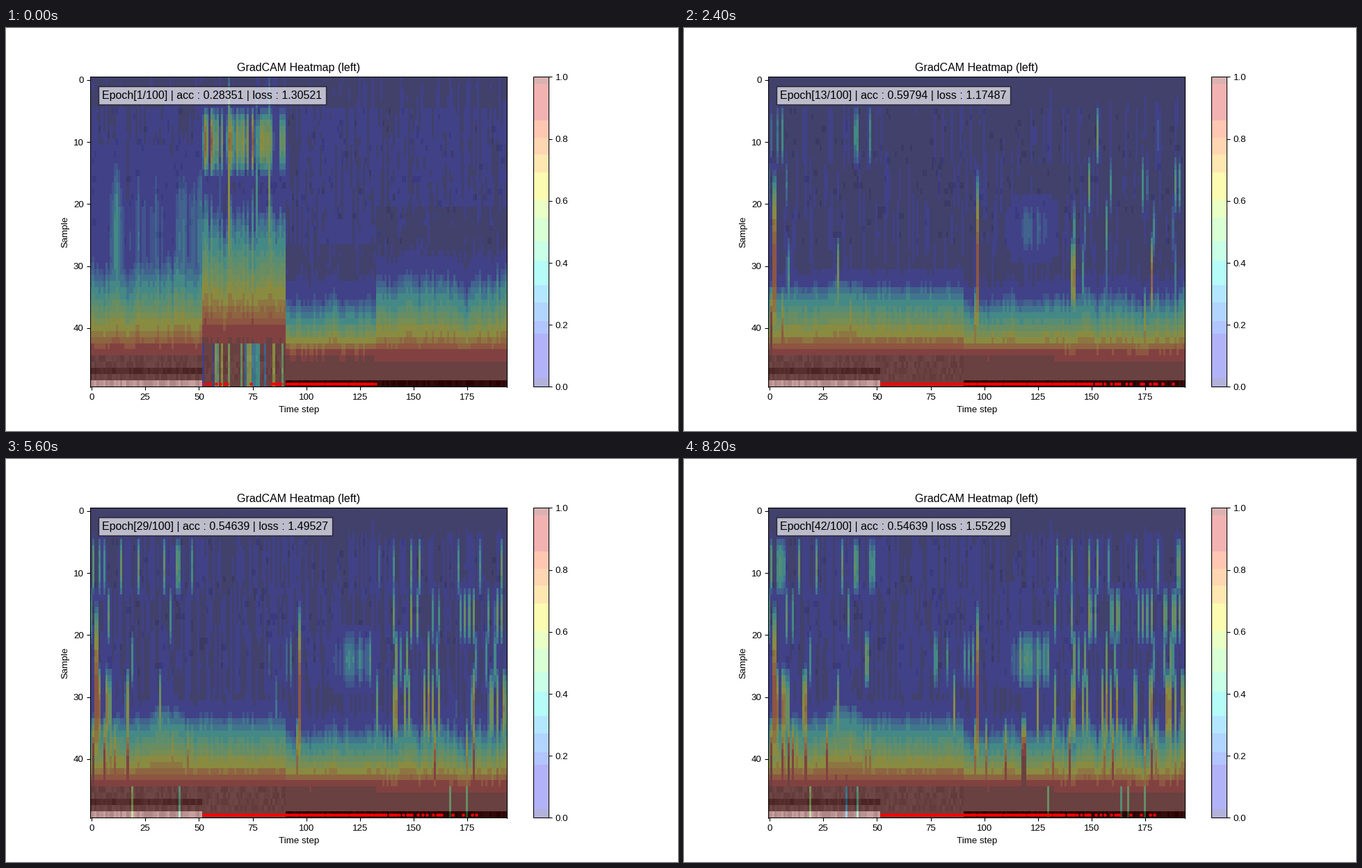
Write a matplotlib script that moves like this. It is 966 by 580 pixels and loops after 8400 ms.

```python
import matplotlib.pyplot as plt
import numpy as np
from matplotlib.animation import FuncAnimation
from matplotlib.colors import ListedColormap

ROWS, COLS, EPOCHS = 50, 194, 42
KEYS = [1, 6, 13, 22, 29, 34, 42]
ACC = [0.28351, 0.68557, 0.59794, 0.54124, 0.54639, 0.55155, 0.54639]
LOSS = [1.30521, 0.87968, 1.17487, 1.45368, 1.49527, 1.51022, 1.55229]

rng = np.random.default_rng(7)
R = np.arange(ROWS)[:, None]
C = np.arange(COLS)
GROUP = np.searchsorted([52, 91, 133], C, side="right")

plt.rcParams.update({
    "font.family": "Liberation Sans", "font.size": 9.62,
    "axes.titlesize": 11.55, "axes.linewidth": 0.77,
})


def smooth(a, n, axis):
    out = np.apply_along_axis(np.convolve, axis, a, np.ones(n) / n, mode="same")
    return out / out.std()


STREAKY = smooth(rng.normal(size=(ROWS, COLS)), 9, 0)
WAVE = smooth(rng.normal(size=COLS), 5, 0)
FINE = rng.normal(size=COLS)
JITTER = 0.5 * WAVE + 0.5 * FINE
TONE = np.clip(0.75 + 0.25 * FINE, 0.2, 1.2)


def chance(p):
    return rng.random(COLS) < p


def by_group(*values):
    return np.take(values, GROUP)


def hump(mid, half):
    """Vertical parabola, 1 at `mid` and 0 beyond `half` rows."""
    return np.clip(1 - ((R - mid) / half) ** 2, 0, 1)


def ramp(start, teal, full, lift):
    """Rise from blue below `start` over `teal` to dark red at `full`."""
    a, b = start - lift, teal - lift
    low = 0.3 * np.clip((R - a) / (b - a), 0, 1) ** 2
    high = 0.7 * np.clip((R - b) / (full - b), 0, 1) ** 1.3
    return np.where(R > 45, 1, low + high)


def stepped_jet():
    """Jet colours merged into a few unequal bands."""
    edges = np.array([0, .025, .17, .209, .271, .327, .406, .469, .547,
                      .6, .69, .749, .807, .861, .978, 1])
    band = np.digitize(np.linspace(0, 0.999, 256), edges) - 1
    return ListedColormap(plt.get_cmap("jet")((edges[:-1] + edges[1:])[band] / 2))


def base_image():
    """Grey signal image below the heat."""
    grain = rng.choice([-1, 0, 1], size=(ROWS, COLS))
    spots = smooth(rng.normal(size=(ROWS, COLS)), 2, 1)
    img = np.full((ROWS, COLS), 0.365)
    img[(spots > 1.6) & (R > 4) & (R < 27)] = 0.33
    left, signal = GROUP == 0, (R > 44) & (GROUP < 2)
    img += np.where(signal, 0.03 * grain, 0)
    img[47, left] -= 0.13
    img[49] = by_group(0.82, 0.365, 0.04, 0.04) + by_group(0.07, 0, 0.03, 0.03) * grain[49]
    return img


def first_field():
    """Untrained look: bright second group, blue haze elsewhere."""
    second = GROUP == 1
    calm = (GROUP > 1) & (R > by_group(0, 0, 26, 20))
    haze = np.where(calm, 0.01, np.where(R < 5, 0.015, 0.037)) + 0.017 * STREAKY
    lift = JITTER * by_group(1.4, 3, 0.8, 1.2) + 2 * np.exp(-((C - 40) / 5) ** 2)
    h = np.maximum(haze, ramp(by_group(21, 15, 30, 26), by_group(32, 23.5, 37.3, 34),
                              by_group(45, 42.5, 45.2, 45.4), lift))
    mist = by_group(0.2, 0, 0, 0) + 0.09 * np.where(GROUP == 0, WAVE, 0)
    h = np.maximum(h, mist * hump(26, 17))
    h = np.maximum(h, np.where(second, 0.68 * TONE, 0) * hump(10, 6.5))
    tall = second & chance(0.2)
    h = np.maximum(h, np.where(tall, 0.62 * TONE, 0) * hump(18, 22))
    drop = second & chance(0.4)
    return np.where(drop & (R > 42), rng.uniform(0.08, 0.7, COLS), h)


def second_field():
    """Calm top, even ramps, a few tall columns."""
    lift = JITTER * by_group(0.8, 0.9, 0.3, 0.4)
    lift += np.where(C < 22, 2.5 * np.abs(FINE), 0)
    lift += np.where((GROUP == 2) & chance(0.08), 8, 0)
    h = np.maximum(0.008 + 0.007 * STREAKY,
                   ramp(by_group(28, 23, 28, 28), by_group(34.5, 33, 39, 34),
                        by_group(45, 45, 45.2, 45.4), lift))
    for col, peak, mid in ((6, 0.6, 20), (12, 0.65, 22), (29, 0.33, 16)):
        h[:, col] = np.maximum(h[:, col], peak * hump(mid, 40)[:, 0])
    return h


# Bands of late streaks: middle row, half height, peak, share of columns per group.
BANDS = [(9, 6, 0.45, (0.16, 0, 0.03, 0.14)),
         (17, 6, 0.52, (0.06, 0, 0.01, 0.22)),
         (24, 6, 0.46, (0.03, 0.06, 0.1, 0.16)),
         (32, 8, 0.68, (0.04, 0.03, 0.04, 0.34)),
         (42, 10, 0.92, (0.08, 0, 0.03, 0.16))]


def make_streaks():
    out = []
    for mid, half, peak, share in BANDS:
        p = by_group(*share) + np.where((C < 20) & (mid > 30), 0.25, 0)
        strong = peak * rng.uniform(0.75, 1.15, COLS)
        faint = 0.15 * rng.random(COLS) ** 2 * (mid < 40)
        out.append((hump(mid, half), np.where(chance(p), strong, faint),
                    rng.uniform(3, 40, COLS)))
    return out


STREAKS = make_streaks()
DIP_START = np.where(chance(0.04) & (GROUP != 1), rng.uniform(22, 42, COLS), np.inf)
DIP_LEVEL = rng.uniform(0.3, 0.65, COLS)


def late_field(epoch):
    """Streaks that each fade in around their own epoch."""
    age = (epoch - 13) / 29
    lift = JITTER * by_group(0.5, 0.5, 0.7, 1.1 + 0.6 * age)
    lift += (1 + age) * np.exp(-((C - 35) / 7) ** 4)
    h = np.maximum(0.009 + 0.009 * STREAKY,
                   ramp(by_group(29.5, 29, 31, 30), by_group(34.5, 34.5, 36.8, 36.3),
                        by_group(45, 45, 45.2, 45.4), lift))
    for shape, peak, half in STREAKS:
        h = np.maximum(h, peak * np.clip((epoch - half) / 14 + 0.5, 0, 1) * shape)
    glow = (0.25 + 0.17 * age) * TONE * np.exp(-((C - 122) / 10) ** 4)
    h = np.maximum(h, glow * hump(24, 6))
    held = 0.85 * np.isin(C, (2, 3, 97))
    h = np.maximum(h, held * hump(30, 17))
    return np.where((epoch > DIP_START) & (R > 44), DIP_LEVEL, h)


FIRST, SECOND, THIRD = first_field(), second_field(), late_field(13)


def heat(epoch):
    if epoch > 13:
        return np.clip(late_field(epoch), 0, 1)
    a, b, f = (FIRST, SECOND, (epoch - 1) / 5) if epoch <= 6 else (
        SECOND, THIRD, (epoch - 6) / 7)
    return np.clip(a + (b - a) * f, 0, 1)


# Groups are learned one after another; the last from left to right, loosely.
SPREAD = np.where(GROUP == 3, (C - 133) / 61 + rng.random(COLS), 0.3 * FINE - WAVE)
ORDER = np.lexsort((SPREAD, by_group(3, 1, 0, 2)))


def update(i):
    epoch = i + 1
    hits = round(np.interp(epoch, KEYS, ACC) * COLS)
    layer.set_data(heat(epoch))
    dots.set_data(ORDER[:hits], np.full(hits, ROWS - 1))
    label.set_text(f"Epoch[{epoch}/100] | acc : {hits / COLS:.5f} | "
                   f"loss : {np.interp(epoch, KEYS, LOSS):.5f}")
    return layer, dots, label


fig, ax = plt.subplots(figsize=(9.66, 5.8), dpi=100)
fig.subplots_adjust(left=121.5 / 966, right=870.2 / 966,
                    top=1 - 70.5 / 580, bottom=1 - 516.5 / 580)
view = dict(vmin=0, vmax=1, aspect="auto", interpolation="nearest")
ax.imshow(base_image(), cmap="gray", **view)
layer = ax.imshow(FIRST, cmap=stepped_jet(), alpha=0.3, **view)
fig.colorbar(layer)
dots, = ax.plot([], [], "o", color="red", ms=3.2, mew=0)
label = ax.text(5, 2.5, "", fontsize=11.55, va="center",
                bbox=dict(facecolor="white", edgecolor="black", alpha=0.65))
ax.set(title="GradCAM Heatmap (left)", xlabel="Time step", ylabel="Sample",
       xlim=(-0.5, COLS - 0.5), ylim=(ROWS - 0.5, -0.5))

anim = FuncAnimation(fig, update, frames=EPOCHS, interval=200, repeat=True)
plt.show()
```
